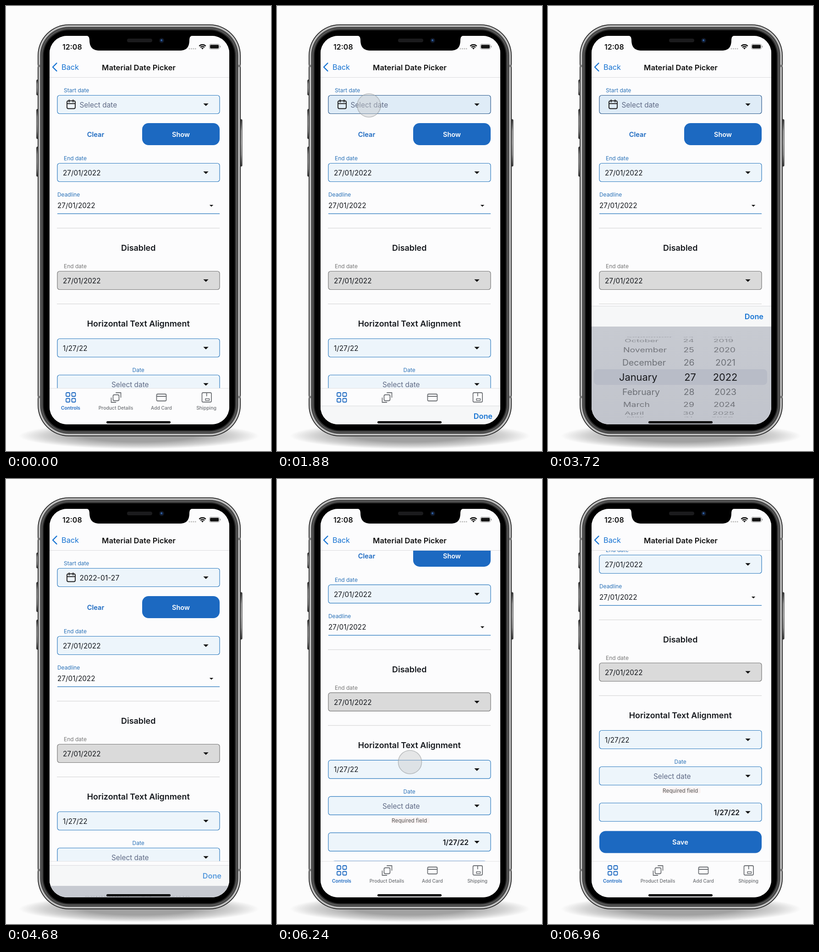
Recreate the animation shown at these times as an HTML page with a canvas. Size 578 by 969 pixels, loop 8 s.

```html
<!DOCTYPE html>
<html lang="en">
<head>
<meta charset="utf-8">
<title>Material Date Picker</title>
<style>
html, body { margin: 0; width: 100%; height: 100%; overflow: hidden; background: #fcfcfc; }
canvas { display: block; width: 578px; height: 969px; }
</style>
</head>
<body>
<canvas id="stage"></canvas>
<script>
const W = 578, H = 969, LOOP = 8000, STEP = 40;
const FONT = 'Inter, "Open Sans", sans-serif';
const BLUE = '#1c69c1', LABEL = '#2a72b8', INK = '#15181d', LINK = '#1673d2', GREY = '#6f7276';
const MONTHS = ['September', 'October', 'November', 'December', 'January', 'February', 'March', 'April', 'May'];

const canvas = document.getElementById('stage');
const c = canvas.getContext('2d');
const dpr = window.devicePixelRatio || 1;
canvas.width = W * dpr;
canvas.height = H * dpr;

const clamp = v => Math.max(0, Math.min(1, v));
const ramp = (t, a, b) => clamp((t - a) / (b - a));
const mix = (a, b, p) => a + (b - a) * p;
const blend = (a, b, p) => `rgb(${a.map((v, i) => Math.round(mix(v, b[i], p))).join()})`;

function box(x, y, w, h, r, fill, stroke, lw = 1.2) {
  c.beginPath();
  c.roundRect(x, y, w, h, r);
  if (fill) { c.fillStyle = fill; c.fill(); }
  if (stroke) { c.strokeStyle = stroke; c.lineWidth = lw; c.stroke(); }
}

function line(points, color, lw) {
  c.beginPath();
  points.forEach(([x, y], i) => i ? c.lineTo(x, y) : c.moveTo(x, y));
  c.strokeStyle = color;
  c.lineWidth = lw;
  c.stroke();
}

function poly(color, ...points) {
  c.beginPath();
  points.forEach(([x, y]) => c.lineTo(x, y));
  c.closePath();
  c.fillStyle = color;
  c.fill();
}

function disc(x, y, r, color) {
  c.beginPath();
  c.arc(x, y, r, 0, 7);
  c.fillStyle = color;
  c.fill();
}

// y is the middle of the capitals
function text(s, x, y, size, color, weight = 400, align = 'left') {
  c.font = `${weight} ${size}px ${FONT}`;
  c.textAlign = align;
  c.fillStyle = color;
  c.fillText(s, x, y + size * 0.363);
}

function gradient(x0, y0, x1, y1, ...colors) {
  const g = c.createLinearGradient(x0, y0, x1, y1);
  colors.forEach((k, i) => g.addColorStop(i / (colors.length - 1), k));
  return g;
}

// ---- motion ----

// critically damped spring, 0 to 1
function spring(ms) {
  const u = Math.max(0, ms) * 0.016;
  return 1 - (1 + u) * Math.exp(-u);
}

const DRAG = { from: 6000, to: 6283, dist: 133.5, end: 177 };

function dragged(t) {
  const p = ramp(t, DRAG.from, DRAG.to);
  return DRAG.dist * (0.1 * p + 1.88 * p * p - 0.98 * p * p * p);
}

function scrollAt(t) {
  if (t < DRAG.to) return dragged(t);
  if (t >= 6720) return DRAG.end;
  return DRAG.end - (DRAG.end - DRAG.dist) * Math.exp((DRAG.to - t) / 100);
}

const sheetAt = t => 911 - 258 * (spring(t - 1836) - spring(t - 4519));

// ---- phone ----

function phone() {
  c.save();
  c.translate(290, 936);
  c.scale(1, 0.11);
  const g = c.createRadialGradient(0, 0, 120, 0, 0, 262);
  g.addColorStop(0, 'rgba(0,0,0,.36)');
  g.addColorStop(0.6, 'rgba(0,0,0,.17)');
  g.addColorStop(1, 'rgba(0,0,0,0)');
  c.fillStyle = g;
  c.fillRect(-280, -280, 560, 560);
  c.restore();

  const button = (x, y, h) => box(x, y, 5, h, 1.5, gradient(x, y, x, y + h, '#333', '#aaa', '#b5b5b5', '#999', '#333'), '#333', 1);
  [[161, 33], [225, 64], [307, 64]].forEach(([y, h]) => button(66.5, y, h));
  button(510, 247, 102);

  const shells = [
    [0, '#222'], [1.5, '#8a8a8a'], [2.5, '#d4d4d4'], [4.5, '#8f8f8f'],
    [6, '#3c3c3c'], [8, '#5a5a5a'], [10.5, '#2c2c2c'], [13, '#000']
  ];
  shells.forEach(([d, color]) => box(69 + d, 40 + d, 443 - 2 * d, 897 - 2 * d, 68 - d, color));

  c.fillStyle = '#777';
  [128, 849].forEach(y => { c.fillRect(69, y, 6, 5); c.fillRect(506, y, 6, 5); });
}

function notch() {
  c.beginPath();
  c.moveTo(174, 64);
  c.quadraticCurveTo(182, 65, 182, 73);
  c.bezierCurveTo(182, 90, 189, 97, 205, 97);
  c.lineTo(378, 97);
  c.bezierCurveTo(394, 97, 400, 90, 400, 73);
  c.quadraticCurveTo(400, 65, 408, 64);
  c.closePath();
  c.fillStyle = '#000';
  c.fill();
  box(264, 71, 55, 8, 4, '#1b1b1d');
  disc(339.5, 75, 5.5, '#10151f');
  disc(339.5, 75, 3, '#14305c');
  disc(339, 74.5, 1.2, '#4f86cc');
}

function statusBar() {
  text('12:08', 123, 89, 16, '#111', 600);
  for (let i = 0; i < 4; i++) disc(400 + i * 4.4, 93, 1.5, '#bbb');

  c.save();
  c.beginPath();
  c.moveTo(428.5, 94.5);
  c.arc(428.5, 94.5, 14, -Math.PI * 0.75, -Math.PI * 0.25);
  c.clip();
  c.strokeStyle = '#111';
  c.lineWidth = 2.4;
  [6.2, 10.2].forEach(r => { c.beginPath(); c.arc(428.5, 94.5, r, 0, 7); c.stroke(); });
  disc(428.5, 94.5, 3.4, '#111');
  c.restore();

  box(443.5, 83, 22, 11, 3.2, null, '#999', 1);
  box(445, 84.5, 19, 8, 2, '#111');
  box(466.8, 86.5, 1.4, 4, 0.7, '#999');
}

function navBar() {
  c.fillStyle = '#fcfcfd';
  c.fillRect(95, 60, 392, 95);
  c.fillStyle = '#dcdcde';
  c.fillRect(95, 155, 392, 1);
  line([[110.5, 124.5], [102, 133], [110.5, 141.5]], LINK, 2.4);
  text('Back', 121, 133.5, 16.3, LINK);
  text('Material Date Picker', 289.5, 133.5, 16.6, '#111', 600, 'center');
}

// ---- page ----

function arrow(x, y, r = 5.7) {
  poly('#111', [x - r, y - r / 2], [x + r, y - r / 2], [x, y + r / 2]);
}

function field(y, fill = '#edf5fb', stroke = '#2f7cc0') {
  box(112, y, 354, 40, 5, fill, stroke);
  arrow(436, y + 20.5);
}

function rule(y) {
  c.fillStyle = '#dadada';
  c.fillRect(111, y, 355, 1.3);
}

function calendarIcon(x, y) {
  box(x, y, 18, 17, 3, null, '#222', 1.9);
  line([[x, y + 6], [x + 18, y + 6]], '#222', 1.9);
  [4.7, 13.3].forEach(d => line([[x + d, y - 2], [x + d, y + 2.5]], '#222', 1.9));
}

function page(t) {
  const focus = ramp(t, 1640, 1840) - ramp(t, 4519, 4640);
  const picked = t >= 4520;
  c.save();
  c.beginPath();
  c.rect(95, 156, 392, 677);
  c.clip();
  c.translate(0, -scrollAt(t));

  text('Start date', 126, 183.5, 12, LABEL);
  field(194.5, blend([237, 245, 251], [223, 236, 247], focus), blend([47, 124, 192], [42, 90, 142], focus));
  calendarIcon(133, 206.5);
  if (picked) text('2022-01-27', 160.5, 215, 15.6, INK);
  else text('Select date', 160.5, 215, 15.4, '#5f6a85');

  text('Clear', 195.5, 279.5, 14.6, BLUE, 600, 'center');
  box(297, 255, 169, 48, 14, BLUE);
  text('Show', 381.5, 279.5, 14.5, '#fff', 600, 'center');

  text('End date', 126, 331.5, 12, LABEL);
  field(342.5);
  text('27/01/2022', 124, 363, 15.3, INK);

  text('Deadline', 112, 410.5, 11.9, LABEL);
  text('27/01/2022', 112, 434.5, 15.3, INK);
  arrow(448, 435, 4.2);
  c.fillStyle = '#2f7cc0';
  c.fillRect(112, 451.7, 354, 1.3);

  rule(483);
  text('Disabled', 288.7, 527, 17.9, INK, 600, 'center');
  text('End date', 126, 566.5, 12, '#777');
  field(577.5, '#dadada', '#777');
  text('27/01/2022', 124, 598, 15.3, INK);

  rule(648);
  text('Horizontal Text Alignment', 288.7, 692, 17.9, INK, 600, 'center');
  field(724.5);
  text('1/27/22', 124, 745, 15.2, INK);
  text('Date', 288.7, 792.5, 12, LABEL, 400, 'center');
  field(803.5);
  text('Select date', 270.7, 824, 15.4, '#5f6a85', 400, 'center');
  box(249, 849, 84, 13, 4, '#faf3f3');
  text('Required field', 288.7, 855.5, 11.8, '#555', 400, 'center');
  field(882.5);
  text('1/27/22', 418, 903, 15.5, INK, 600, 'right');
  box(112, 943.5, 354, 48, 14, BLUE);
  text('Save', 288.5, 968, 14.7, '#fff', 600, 'center');
  c.restore();
}

function tabBar() {
  c.fillStyle = '#fcfcfd';
  c.fillRect(95, 832, 392, 80);
  c.fillStyle = '#e2e2e4';
  c.fillRect(95, 832, 392, 1);

  [131, 143.5].forEach(x => [842, 854.5].forEach(y => box(x, y, 8, 8, 2, null, BLUE, 1.8)));
  box(233.5, 846.5, 13, 13, 3, null, GREY, 1.8);
  line([[240, 842], [250.5, 842], [250.5, 852]], GREY, 1.8);
  line([[229.5, 853.5], [229.5, 863], [239.5, 863]], GREY, 1.8);
  box(328.5, 845, 21, 15, 2.5, null, GREY, 1.8);
  line([[328.5, 850], [349.5, 850]], GREY, 1.8);
  box(427.5, 842, 20.5, 20.5, 2.5, null, GREY, 1.8);
  line([[437.7, 842], [437.7, 849]], GREY, 1.8);
  box(435, 855, 8.5, 4, 0.5, null, GREY, 1.6);

  text('Controls', 141, 875, 10.2, BLUE, 600, 'center');
  text('Product Details', 239.5, 875, 10.4, GREY, 500, 'center');
  text('Add Card', 339, 875, 10.2, GREY, 500, 'center');
  text('Shipping', 437, 875, 10.4, GREY, 500, 'center');
}

// ---- date wheel ----

function cell(s, x, y, size, squeeze, color, align) {
  c.save();
  c.translate(x, y);
  c.scale(1, squeeze);
  text(s, 0, 0, size, color, 400, align);
  c.restore();
}

function wheel(mid) {
  box(100, mid - 17, 378, 34, 8, '#b8bcc7');
  for (let i = -4; i <= 4; i++) {
    const k = Math.abs(i), a = i * 0.377;
    const y = mid + 87 * Math.sin(a), squeeze = Math.max(0.12, Math.cos(a));
    const size = k ? 19.4 : 21.8;
    const color = k ? `rgba(40,42,48,${[0, 0.56, 0.53, 0.4, 0.22][k]})` : '#17181b';
    cell(MONTHS[i + 4], [155, 162, 164, 167, 171][k], y, size, squeeze, color, 'left');
    cell(String(27 + i), 310 - (k && 1.8 + k * 0.6), y, size, squeeze, color, 'center');
    cell(String(2022 + i), [386.5, 387, 385, 382.5, 380][k], y, size, squeeze, color, 'center');
  }
}

function sheet(t) {
  const top = sheetAt(t);
  if (top > 910.5) return;
  c.fillStyle = gradient(0, top + 45, 0, top + 258, '#c7cad1', '#c1c4cc');
  c.fillRect(95, top + 45, 392, 300);
  c.fillStyle = '#f6f7f8';
  c.fillRect(95, top, 392, 45);
  c.fillStyle = '#dadbdd';
  c.fillRect(95, top, 392, 1);
  c.globalAlpha = 1 - 0.6 * ramp(t, 4280, 4320) + 0.6 * ramp(t, 4519, 4839);
  text('Done', 470, top + 23, 16.3, LINK, 600, 'right');
  c.globalAlpha = 1;
  wheel(top + 155);
}

// ---- touches ----

const touches = [
  { show: 1400, press: 1640, up: 1880, x: 200.5, y: 216.5 },
  { show: 3880, press: 4280, up: 4520, x: 452, y: 676 },
  { show: 5920, press: 6020, up: 6400, x: 290, y: 728.5, drag: true }
];

function touch(t, p) {
  const fade = 1 - ramp(t, p.up, p.up + 120);
  if (t < p.show || !fade) return;
  const r = mix(30, 25.5, ramp(t, p.press, p.press + 200));
  c.globalAlpha = fade;
  c.beginPath();
  c.arc(p.x, p.y - (p.drag ? dragged(t) : 0), r, 0, 7);
  c.fillStyle = 'rgba(200,202,204,.45)';
  c.fill();
  c.strokeStyle = 'rgba(145,148,150,.55)';
  c.lineWidth = 1.6;
  c.stroke();
  c.globalAlpha = 1;
}

function draw(now) {
  const t = Math.floor((now % LOOP) / STEP) * STEP;
  c.setTransform(dpr, 0, 0, dpr, 0, 0);
  c.lineJoin = c.lineCap = 'round';
  c.fillStyle = '#fcfcfc';
  c.fillRect(0, 0, W, H);
  phone();

  c.save();
  c.beginPath();
  c.roundRect(95, 65, 392, 846, 38);
  c.clip();
  c.fillStyle = '#fcfcfd';
  c.fillRect(95, 65, 392, 846);
  page(t);
  navBar();
  statusBar();
  tabBar();
  sheet(t);
  box(219, 904, 140, 5, 2.5, '#050505');
  touches.forEach(p => touch(t, p));
  c.restore();

  notch();
}

let start;
function loop(now) {
  start ??= now;
  draw(now - start);
  requestAnimationFrame(loop);
}
draw(0);
requestAnimationFrame(loop);
</script>
</body>
</html>
```
